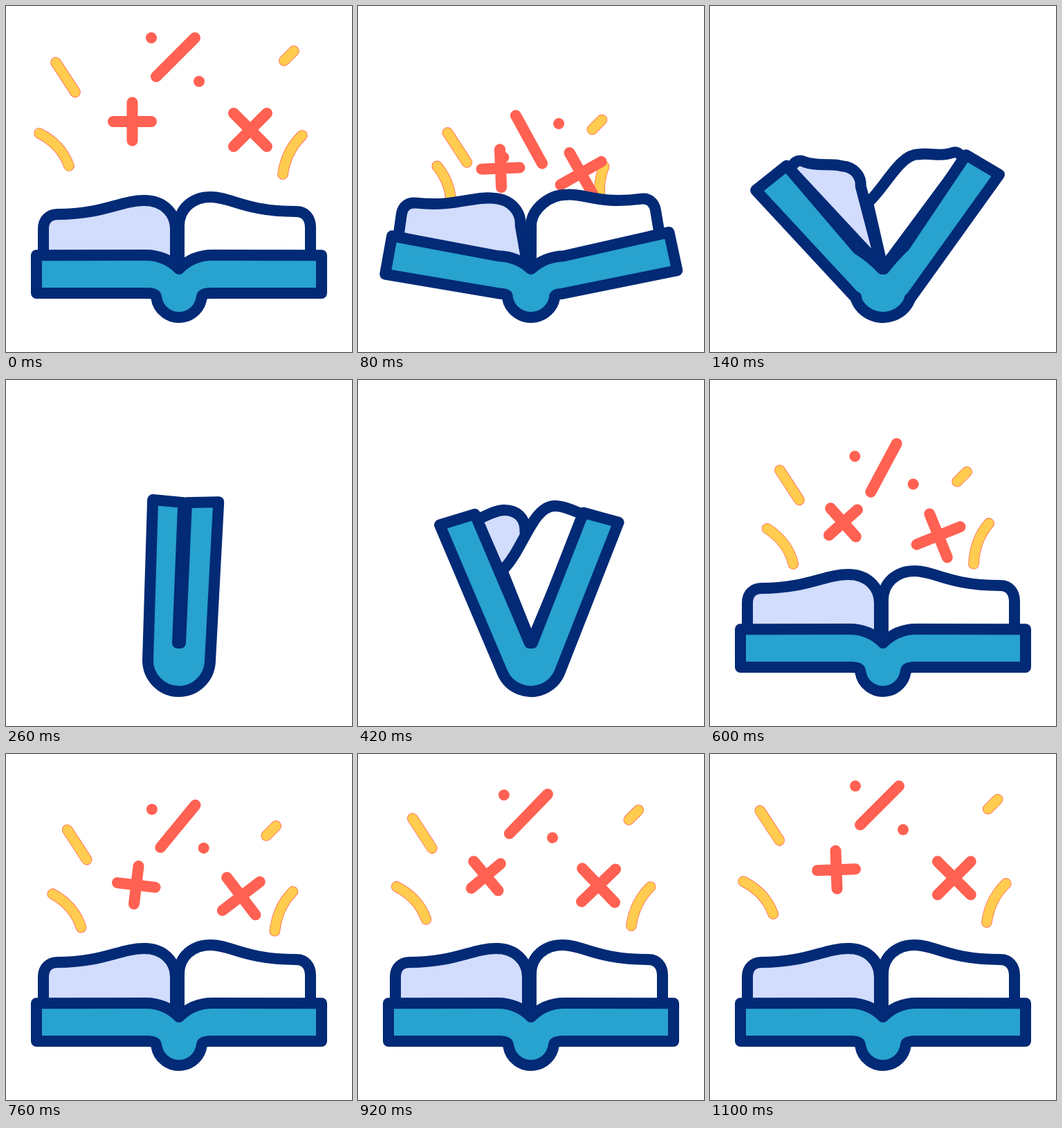
Write an HTML page with a canvas that moves like this. It is 500 px wide and 500 px high and loops after 1.12 s.

```html
<!DOCTYPE html>
<html lang="en">
<head>
<meta charset="utf-8">
<title>Open book</title>
<style>
html, body { margin: 0; height: 100%; overflow: hidden; background: #fff; }
canvas { display: block; width: 100vw; height: 100vh; }
</style>
</head>
<body>
<canvas width="500" height="500"></canvas>
<script>
const ctx = document.querySelector('canvas').getContext('2d');
const LOOP = 1120, CX = 250, HINGE = 380;
const NAVY = '#022a76', TEAL = '#28a2ce', LAVENDER = '#d2dcfd', RED = '#ff6152', YELLOW = '#ffcc4f';
const rad = deg => deg * Math.PI / 180;
const clamp = x => Math.max(0, Math.min(1, x));
const mix = (a, b, k) => a + (b - a) * k;
const mixPt = (p, q, k) => [mix(p[0], q[0], k), mix(p[1], q[1], k)];
const ease = x => (x = clamp(x)) < 0.5 ? 4 * x ** 3 : 1 - 4 * (1 - x) ** 3;

// Flying marks: centre, offset and turn while sucked in, then while popping out.
const marks = [
  { path: 'M-14 -21.5L14 21.5', at: [86, 103], suck: [56, 99, 0], pop: [29, 49, 0], color: YELLOW },
  { path: 'M7 -7L-7 7', at: [409, 72], suck: [-62, 97, 0], pop: [-45, 68, 0], color: YELLOW },
  { path: 'M-22 -24Q10 -8 21 23', at: [70, 208], suck: [53, 53, 24], pop: [32, 33, 6], color: YELLOW },
  { path: 'M14 -28Q-9 -6 -14 28', at: [414, 215], suck: [-58, 47, -24], pop: [-22, 21.5, -6], color: YELLOW },
  { path: 'M28 -28L-28 28M-35 -28h.01M34 35h.01', at: [245, 74], suck: [2, 116, -72], pop: [6, 53, -17], color: RED },
  { path: 'M-27.5 0h55M0 -27.5v55', at: [182.5, 167], suck: [23, 66, -90], pop: [10, 39, -132], spin: 0.83, color: RED },
  { path: 'M-24 -24L24 24M24 -24L-24 24', at: [353, 179], suck: [-30, 61, 103], pop: [-23, 46, 23], color: RED }
].map(m => ({ ...m, path: new Path2D(m.path) }));

// Page outlines as point lists: lying open, and raised by `lift` degrees.
const leftPage = {
  dir: 1, lift: 61.8, color: LAVENDER,
  flat: [[245, 380], [245, 322], [245, 300], [228, 281], [200, 281], [165, 281],
    [140, 301], [75, 301], [62, 301], [54, 309], [54, 322], [54, 360]],
  raised: [[250, 380], [243, 212], [242, 198], [232, 186], [213, 186], [202, 186],
    [190, 193], [178, 199], [176, 199], [174, 198], [173, 197], [173, 197]]
};
const rightPage = {
  dir: -1, lift: 63.4, color: '#fff',
  flat: [[250, 380], [250, 318], [250, 292], [270, 276], [296, 276], [325, 276],
    [345, 297], [420, 297], [432, 297], [440, 306], [440, 320], [440, 360]],
  raised: [[250, 380], [207, 275], [238, 245], [250, 180], [283, 180], [295, 180],
    [308, 186], [320, 192], [322, 192], [324, 193], [325, 194], [325, 194]]
};

function turn([x, y], deg) {
  const c = Math.cos(rad(deg)), s = Math.sin(rad(deg));
  x -= CX; y -= HINGE;
  return [CX + x * c - y * s, HINGE + x * s + y * c];
}
for (const p of [leftPage, rightPage]) p.raised = p.raised.map(q => turn(q, -p.dir * p.lift));

function drawMarks(t) {
  const popping = t > 300;
  const left = Math.max(0, (600 - t) / 65);
  const amount = popping ? ((LOOP - t) / 520) ** 1.5 + left * left : (t / 80) ** 2;
  for (const m of marks) {
    const [dx, dy, angle] = popping ? m.pop : m.suck;
    const limit = (HINGE - m.at[1]) / dy;
    if (amount >= limit) continue;
    ctx.save();
    ctx.translate(m.at[0] + dx * amount, m.at[1] + dy * amount);
    ctx.rotate(rad(angle * (popping ? amount ** (m.spin || 2) : amount)));
    ctx.strokeStyle = RED;
    ctx.lineWidth = m.color === RED ? 16 : 15.6;
    ctx.stroke(m.path);
    if (m.color === YELLOW) {
      ctx.strokeStyle = YELLOW;
      ctx.lineWidth = 14;
      ctx.stroke(m.path);
    }
    ctx.restore();
  }
}

function paint(color) {
  ctx.fillStyle = color;
  ctx.strokeStyle = NAVY;
  ctx.lineWidth = 16;
  ctx.fill();
  ctx.stroke();
}

function drawPage(page, angle) {
  const k = clamp(angle / page.lift);
  const p = page.flat.map((q, i) => turn(mixPt(q, page.raised[i], k), page.dir * angle));
  ctx.beginPath();
  ctx.moveTo(...p[0]);
  ctx.lineTo(...p[1]);
  for (let i = 2; i < 11; i += 3) ctx.bezierCurveTo(...p[i], ...p[i + 1], ...p[i + 2]);
  ctx.lineTo(...p[11]);
  ctx.closePath();
  paint(page.color);
}

// Key points of one cover half; side is -1 for left, 1 for right.
function coverHalf(side, angle, r) {
  const k = clamp(angle / 60);
  const polar = (y, len, deg) => [CX + side * len * Math.cos(rad(deg)), y - len * Math.sin(rad(deg))];
  const beta = rad(k < 1 ? 8 + 17 * k : 85 - angle);
  const inner = polar(HINGE, 207 - 4 * k, angle + 5.5);
  const outer = polar(415, 206 + 40 * Math.sin(rad(angle * 1.2)), angle * 0.94);
  const spine = [CX + side * r * Math.cos(beta), 450 - r + r * Math.sin(beta)];
  const fold = [CX + side * 2 * k, HINGE];
  return {
    beta, inner, outer, spine, fold,
    edge: mixPt([CX + side * 45, 415], spine, k),
    edgeBend: mixPt([CX + side * 33, 415], spine, k),
    top: mixPt([CX + side * 48, 360], mixPt(inner, fold, 0.78), k),
    topBend: mixPt([CX + side * 20, 360], mixPt(inner, fold, 0.9), k)
  };
}

function drawBook(angleL, angleR) {
  const r = mix(33, 45, (clamp(angleL / 60) + clamp(angleR / 60)) / 2);
  const L = coverHalf(-1, angleL, r), R = coverHalf(1, angleR, r);

  // Pages stay between the outer edges of the covers.
  ctx.save();
  ctx.beginPath();
  for (const p of [L.outer, [L.outer[0], 0], [R.outer[0], 0], R.outer, [CX, 450]]) ctx.lineTo(...p);
  ctx.clip();
  drawPage(leftPage, angleL);
  drawPage(rightPage, angleR);
  ctx.restore();

  ctx.beginPath();
  ctx.moveTo(...L.outer);
  ctx.lineTo(...L.edge);
  ctx.quadraticCurveTo(...L.edgeBend, ...L.spine);
  ctx.arc(CX, 450 - r, r, Math.PI - L.beta, R.beta, true);
  ctx.quadraticCurveTo(...R.edgeBend, ...R.edge);
  ctx.lineTo(...R.outer);
  ctx.lineTo(...R.inner);
  ctx.lineTo(...R.top);
  ctx.quadraticCurveTo(...R.topBend, ...R.fold);
  ctx.lineTo(...L.fold);
  ctx.quadraticCurveTo(...L.topBend, ...L.top);
  ctx.lineTo(...L.inner);
  ctx.closePath();
  paint(TEAL);
}

const swing = (t, max, shut, open) => max * (ease(t / shut) - ease((t - open) / (540 - open)));

function frame(now) {
  const t = now % LOOP;
  ctx.fillStyle = '#fff';
  ctx.fillRect(0, 0, 500, 500);
  ctx.lineCap = ctx.lineJoin = 'round';
  drawMarks(t);
  drawBook(swing(t, 86.5, 286, 335), swing(t, 81.4, 264, 346));
  requestAnimationFrame(frame);
}
requestAnimationFrame(frame);
</script>
</body>
</html>
```
